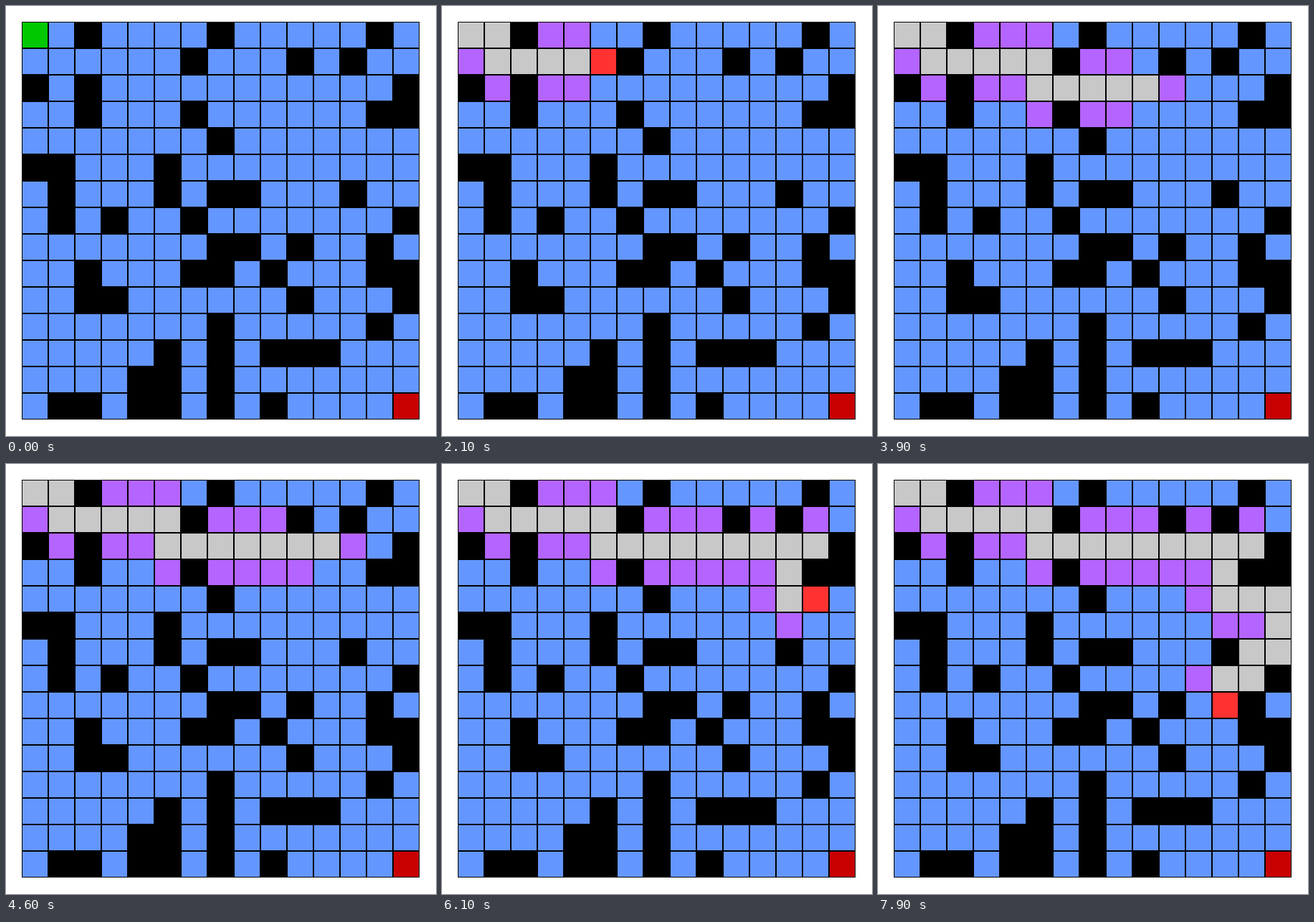
A matplotlib script that plays this animation: 600 by 600 pixels, repeating every 8000 ms.

```python
from itertools import islice

import matplotlib.pyplot as plt
from matplotlib.animation import FuncAnimation
from matplotlib.patches import Rectangle

SIZE, CELL, MARGIN = 15, 37, 22
FRAMES, INTERVAL = 80, 100

WALL, FREE = "#000000", "#6496ff"
START_COLOR, GOAL_COLOR = "#00c800", "#c80000"
OPEN, CURRENT, CLOSED = "#b464ff", "#ff3232", "#c8c8c8"

MAZE = """
..#....#.....#.
......#...#.#..
#.#...........#
..#...#......##
.......#.......
##...#.........
.#...#.##...#..
.#.#..#.......#
.......##.#..#.
..#...##.#...##
..##......#...#
.......#.....#.
.....#.#.###...
....##.#.......
.##.##.#.#.....
""".split()

START, GOAL = (0, 0), (SIZE - 1, SIZE - 1)


def distance(cell):
    return abs(GOAL[0] - cell[0]) + abs(GOAL[1] - cell[1])


def neighbours(col, row):
    for dx, dy in ((1, 0), (-1, 0), (0, 1), (0, -1)):
        x, y = col + dx, row + dy
        if 0 <= x < SIZE and 0 <= y < SIZE and MAZE[y][x] == ".":
            yield x, y


def search():
    """Greedy best-first search, yielding the board after every step."""
    board = {(x, y): WALL if MAZE[y][x] == "#" else FREE
             for y in range(SIZE) for x in range(SIZE)}
    board[START], board[GOAL] = START_COLOR, GOAL_COLOR
    yield dict(board)

    queue, closed = [START], set()
    board[START] = OPEN
    yield dict(board)
    while queue:
        cell = min(queue, key=distance)  # ties go to the oldest entry
        queue.remove(cell)
        closed.add(cell)
        board[cell] = CURRENT
        yield dict(board)
        board[cell] = CLOSED
        for other in neighbours(*cell):
            if other in closed:
                continue
            if other not in queue:
                queue.append(other)
            board[other] = OPEN
            yield dict(board)


boards = list(islice(search(), FRAMES))

fig = plt.figure(figsize=(6, 6), dpi=100, facecolor="white")
ax = fig.add_axes([0, 0, 1, 1])
ax.set_xlim(0, 600)
ax.set_ylim(600, 0)
ax.axis("off")


def add_square(x, y, side, color):
    return ax.add_patch(Rectangle((x, y), side, side, facecolor=color,
                                  linewidth=0, antialiased=False))


# The black backing shows between the cells as grid lines.
add_square(MARGIN, MARGIN, SIZE * CELL, WALL)
squares = {
    (x, y): add_square(MARGIN + 1 + x * CELL, MARGIN + 1 + y * CELL, CELL - 2, color)
    for (x, y), color in boards[0].items()
}


def draw(frame):
    for cell, color in boards[frame].items():
        squares[cell].set_facecolor(color)
    return list(squares.values())


anim = FuncAnimation(fig, draw, frames=FRAMES, interval=INTERVAL,
                     repeat=True, repeat_delay=0)
plt.show()
```
